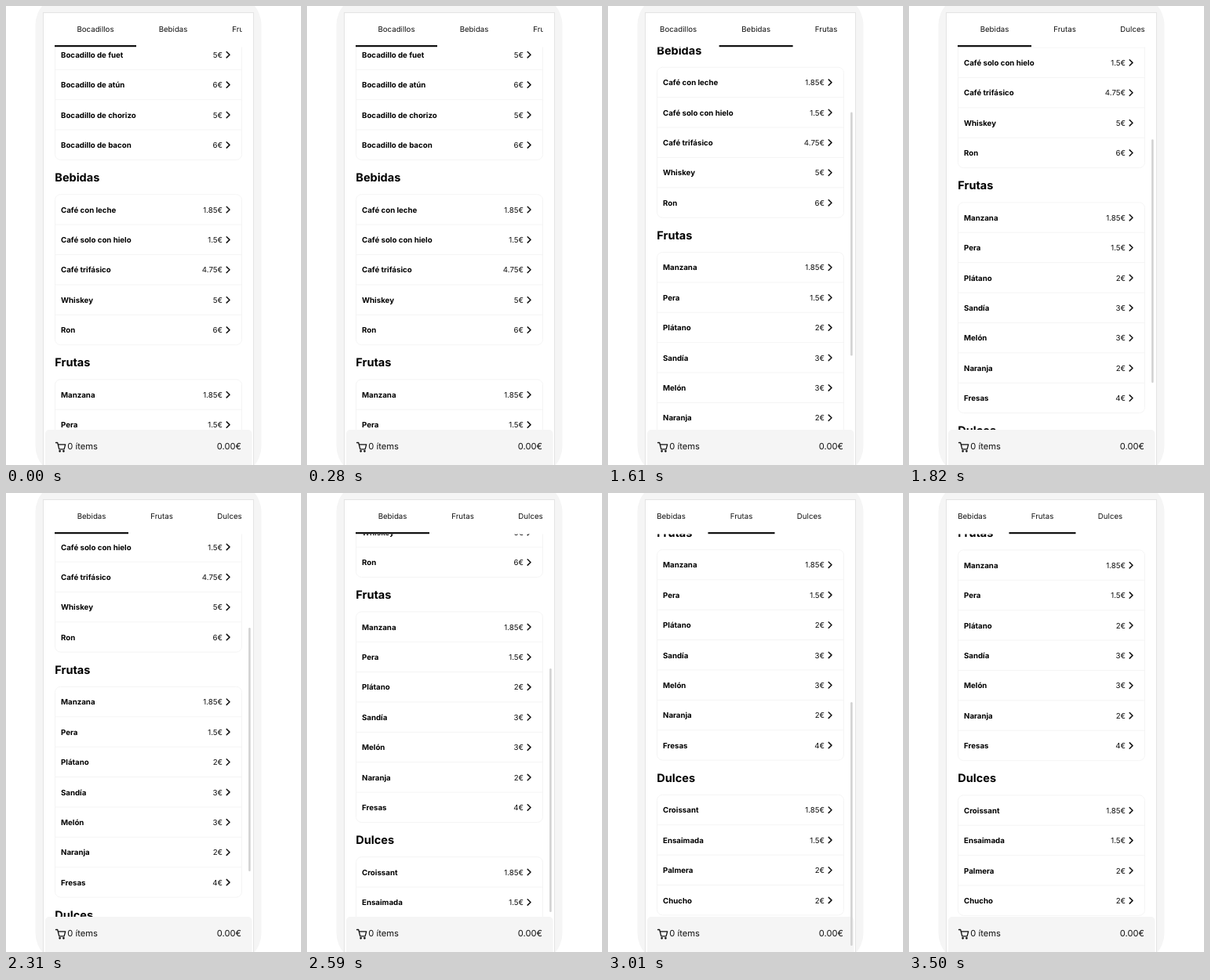
An HTML page for the animation above (4270 ms loop, 376x586 px).

```html
<!DOCTYPE html>
<html lang="es">
<head>
<meta charset="utf-8">
<title>Carta</title>
<style>
  html, body { margin: 0; width: 100%; height: 100%; overflow: hidden; background: #fff; }
  svg { display: block; }
  text { font: 400 9.7px Inter, "Open Sans", sans-serif; fill: #111; text-rendering: geometricPrecision; }
  .name { font-weight: 700; fill: #000; }
  .title { font-size: 14.5px; font-weight: 700; fill: #000; }
  .cart { font-size: 11.15px; }
  .line { fill: none; stroke: #f2f2f2; stroke-width: .8; }
  .icon { fill: none; stroke: #111; stroke-width: 1.3; stroke-linecap: round; stroke-linejoin: round; }
  .chevron { stroke-width: 1.5; }
</style>
</head>
<body>
<svg width="376" height="586" viewBox="0 0 376 586">
  <defs>
    <clipPath id="listClip"><rect x="48" y="52.5" width="267" height="534"/></clipPath>
    <clipPath id="tabClip"><rect x="62" y="9" width="238.7" height="44"/></clipPath>
  </defs>
  <rect x="37.5" y="-14" width="288" height="614" rx="38" fill="#f5f5f5"/>
  <rect x="47.5" y="8.5" width="268" height="590" fill="#fff" stroke="#e4e4e4"/>
  <g clip-path="url(#listClip)"><g id="list"></g></g>
  <g clip-path="url(#tabClip)">
    <g id="tabs"></g>
    <rect id="underline" y="50" height="2.2" fill="#111"/>
  </g>
  <path d="M50 586V546a5 5 0 0 1 5-5H308.5a5 5 0 0 1 5 5V586Z" fill="#f5f5f5"/>
  <g class="icon">
    <path d="M63.5 557.5h2.2l2.1 8.3h6.3l1.6-6h-9.3"/>
    <circle cx="68.6" cy="568.3" r=".7"/>
    <circle cx="73.4" cy="568.3" r=".7"/>
  </g>
  <text class="cart" x="78.3" y="566">0 ítems</text>
  <text class="cart" x="300" y="566" text-anchor="end">0.00€</text>
  <rect id="bar" x="309.1" width="2.6" height="311" rx="1.3" fill="#d2d2d2"/>
</svg>
<script>
const LOOP = 4270, STEP = 70;
const LEFT = 62, PITCH = 38.4, TITLE_GAP = 41;
const $ = id => document.getElementById(id);

const sections = [
  { title: 'Bocadillos', tabWidth: 104, items: 'Bocadillo de fuet 5|Bocadillo de atún 6|Bocadillo de chorizo 5|Bocadillo de bacon 6' },
  { title: 'Bebidas', tabWidth: 94, items: 'Café con leche 1.85|Café solo con hielo 1.5|Café trifásico 4.75|Whiskey 5|Ron 6' },
  { title: 'Frutas', tabWidth: 85, items: 'Manzana 1.85|Pera 1.5|Plátano 2|Sandía 3|Melón 3|Naranja 2|Fresas 4' },
  { title: 'Dulces', tabWidth: 88, items: 'Croissant 1.85|Ensaimada 1.5|Palmera 2|Chucho 2' }
];

function add(parent, tag, attrs, text = '') {
  const el = document.createElementNS('http://www.w3.org/2000/svg', tag);
  for (const key in attrs) el.setAttribute(key, attrs[key]);
  el.textContent = text;
  parent.append(el);
}

function addRow(list, item, y) {
  const cut = item.lastIndexOf(' ');
  add(list, 'text', { class: 'name', x: 70, y: y + 3.8 }, item.slice(0, cut));
  add(list, 'text', { x: 276, y: y + 3.8, 'text-anchor': 'end' }, item.slice(cut + 1) + '€');
  add(list, 'path', { class: 'icon chevron', d: `M281.2 ${y - 3.5}l3.8 3.7-3.8 3.7` });
}

function build() {
  const list = $('list');
  let y = 21, tabX = LEFT;
  for (const section of sections) {
    section.tabX = tabX;
    add($('tabs'), 'text', { x: tabX + section.tabWidth / 2, y: 33.2, 'text-anchor': 'middle' }, section.title);
    tabX += section.tabWidth;

    add(list, 'text', { class: 'title', x: LEFT + 0.3, y: y + 5.4 }, section.title);
    y += TITLE_GAP;
    const items = section.items.split('|');
    add(list, 'rect', { class: 'line', x: 62.5, y: y - PITCH / 2, width: 238, height: items.length * PITCH, rx: 7 });
    items.forEach((item, i) => {
      if (i) add(list, 'path', { class: 'line', d: `M62.5 ${y - PITCH / 2}h238` });
      addRow(list, item, y);
      y += PITCH;
    });
    y += TITLE_GAP + 0.6 - PITCH;
  }
}

const progress = (t, start, end) => Math.min(1, Math.max(0, (t - start) / (end - start)));

// A short pull by the finger, then a coast; more friction stops it sooner
const flick = (t, start, end, friction) => 1 - (1 - progress(t, start, end) ** 1.5) ** friction;
const easeOut = (t, start, end) => 1 - (1 - progress(t, start, end)) ** 2;

const scrollAt = t =>
  229.5 * flick(t, 1260, 1890, 2.3) + 175 * flick(t, 2380, 3010, 3.7) - 0.5 * progress(t, 3220, 3290);
const tabShiftAt = t => 104 * easeOut(t, 1580, 1820) + 28.5 * easeOut(t, 2780, 3010);

function draw(time) {
  const t = Math.floor(time % LOOP / STEP) * STEP;
  const scroll = scrollAt(t), shift = tabShiftAt(t);
  const active = sections[t < 1610 ? 0 : t < 2800 ? 1 : 2];
  $('list').setAttribute('transform', `translate(0 ${-scroll})`);
  $('tabs').setAttribute('transform', `translate(${-shift} 0)`);
  $('underline').setAttribute('x', active.tabX - shift);
  $('underline').setAttribute('width', active.tabWidth);
  $('bar').setAttribute('y', 47.4 + 0.543 * scroll);
  $('bar').setAttribute('opacity', t >= 1330 && t < 3500 ? 1 : 0);
}

build();
const start = performance.now();
function tick() {
  draw(performance.now() - start);
  requestAnimationFrame(tick);
}
tick();
</script>
</body>
</html>
```
